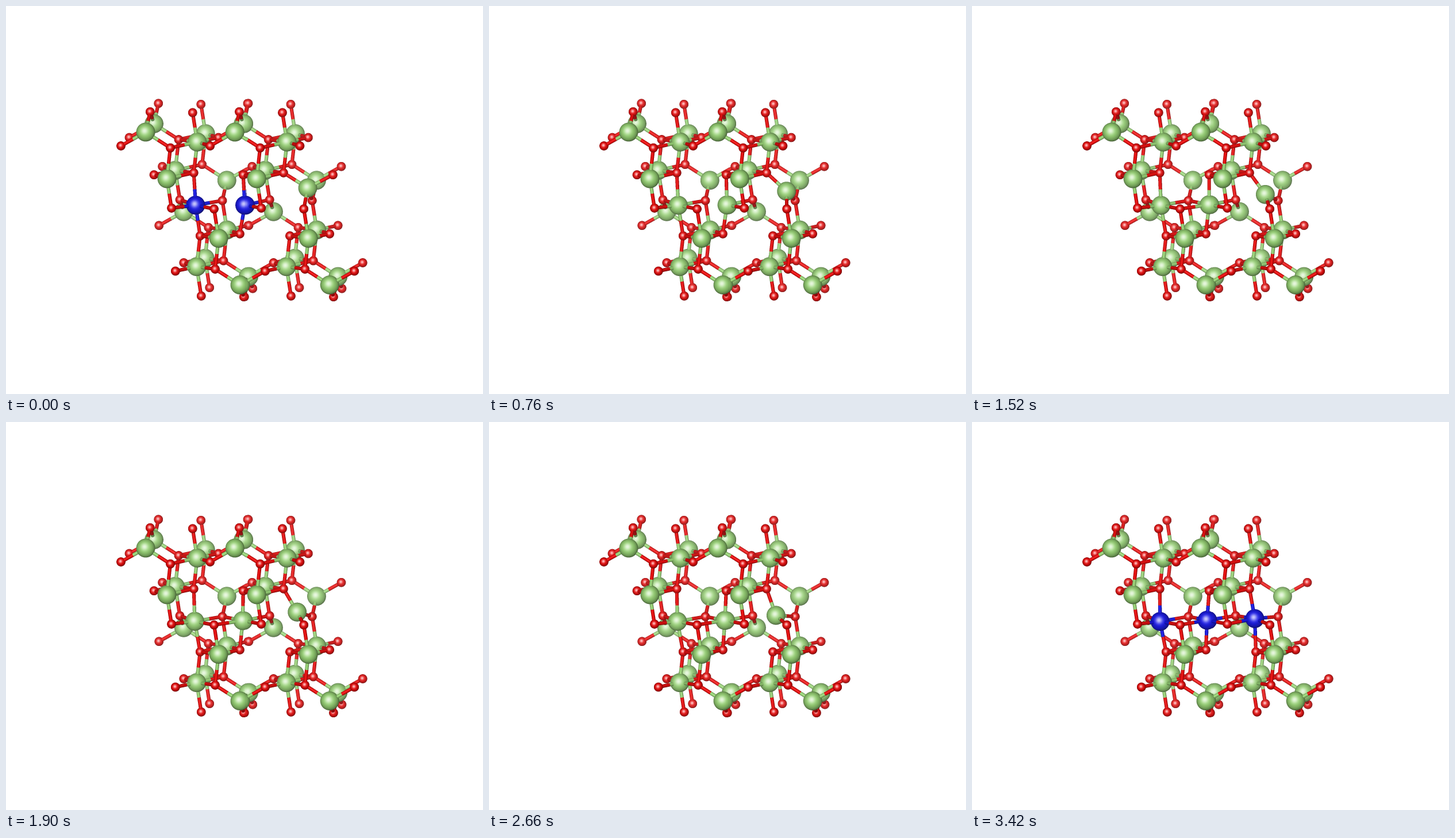
These frames come from a looping animation (830x674 px, 3.8 s). A matplotlib script:

```python
import itertools
import numpy as np
import matplotlib.pyplot as plt
from matplotlib.animation import FuncAnimation

W, H, DPI = 830, 674, 100
FRAMES, INTERVAL = 10, 380
X0, Y0, X1, Y1 = 180, 150, 640, 525   # region that holds the crystal
SS = 3                                # supersampling

# Crystal: in-layer x, y in pixels, third coordinate counts layers
A = np.array([155.2, 0, 0])
B = np.array([44.5, 160, 0.5])
INVERT = np.array([605.5, 543.5, 0.5])
TETRA = np.array([243, 219, 0])
OCTA = np.array([280, 300, 0])
OXYGEN = np.array([(200, 243, 0), (286, 246.5, 0), (288, 351, 0)])
LAYERS = (0, 0.5, 1, 1.5)
SHIFT, STEP = 14.5, 76                # screen offset and length of a layer
CUTOFF = 58.35                        # longest metal-oxygen bond

# Start and end of the migrating atoms on screen, all at half depth
PATHS = np.array([[(330, 346), (327.3, 346.5)],
                  [(415.5, 346), (409, 344.3)],
                  [(524, 316), (491, 341.5)]])

GREEN = np.array([0.62, 0.86, 0.48])
BLUE = np.array([0.08, 0.08, 0.94])
RED = np.array([0.95, 0.05, 0.05])
R_METAL, R_OXY, R_BOND = 16.4, 7.9, 3.1

LIGHT = np.array([-0.12, -0.14, 0.98])
LIGHT = LIGHT / np.linalg.norm(LIGHT)

gx = (np.arange((X1 - X0) * SS) + 0.5) / SS + X0
gy = (np.arange((Y1 - Y0) * SS) + 0.5) / SS + Y0


def images_of(site, cells_a, cells_b, layers):
    """Copies of a site under inversion and lattice translation."""
    for base in (site, INVERT - site):
        for n, m in itertools.product(cells_a, cells_b):
            p = base + n * A + m * B
            for d in layers:
                if (d - p[2]) % 1 == 0:
                    yield np.array([p[0], p[1], d])


def framework():
    metals = list(images_of(OCTA, range(2), range(2), LAYERS))
    # half-depth tetrahedra are filled only in the back layer
    metals += images_of(TETRA, range(2), range(2), (0, 1, 1.5))
    oxygens = [p for site in OXYGEN
               for p in images_of(site, range(-2, 4), range(-1, 3), LAYERS)]
    return metals, oxygens


def movers(u):
    d = 0.5
    for start, end in PATHS:
        x, y = start + (end - start) * u
        yield np.array([x - SHIFT * d, y + SHIFT * d, d])


def bonded(p, q):
    return np.linalg.norm((p - q) * (1, 1, STEP)) < CUTOFF


def to_view(p):
    """Crystal to camera space, z pointing at the viewer."""
    x, y, d = p
    return np.array([x + SHIFT * d, y - SHIFT * d, -73 * d - 0.2 * (y - x)])


class Canvas:
    def __init__(self):
        shape = (len(gy), len(gx))
        self.rgb = np.ones(shape + (3,))
        self.z = np.full(shape, -1e9)

    def window(self, xa, xb, ya, yb):
        i, j = np.searchsorted(gx, (xa, xb))
        k, m = np.searchsorted(gy, (ya, yb))
        return (slice(k, m), slice(i, j)), gx[None, i:j], gy[k:m, None]

    def paint(self, win, mask, z, normal, base, spec, fog):
        mask = mask & (z > self.z[win])
        nx, ny, nz = (n[mask] for n in normal)
        nl = np.clip(nx * LIGHT[0] + ny * LIGHT[1] + nz * LIGHT[2], 0, 1)
        color = base * (0.4 + 0.6 * nl)[:, None]
        color = color + (1 - color) * (spec * nl ** 14)[:, None]
        color = color + (1 - color) * fog
        self.rgb[win][mask] = color
        self.z[win][mask] = z[mask]

    def ball(self, c, r, base, fog):
        win, px, py = self.window(c[0] - r, c[0] + r, c[1] - r, c[1] + r)
        dx, dy = px - c[0], py - c[1]
        h = r * r - dx * dx - dy * dy
        nz = np.sqrt(np.maximum(h, 0))
        normal = (dx / r + 0 * nz, dy / r + 0 * nz, nz / r)
        self.paint(win, h > 0, c[2] + nz, normal, base, 0.75, fog)

    def stick(self, a, b, base_a, base_b, fog):
        r = R_BOND
        length = np.linalg.norm(b - a)
        ux, uy, uz = (b - a) / length
        lo, hi = np.minimum(a, b) - r, np.maximum(a, b) + r
        win, px, py = self.window(lo[0], hi[0], lo[1], hi[1])
        dx, dy = px - a[0], py - a[1]
        s = dx * ux + dy * uy
        k = 1 - uz * uz
        disc = (s * uz) ** 2 - k * (dx * dx + dy * dy - s * s - r * r)
        t = (s * uz + np.sqrt(np.maximum(disc, 0))) / k
        along = s + t * uz
        normal = ((dx - along * ux) / r, (dy - along * uy) / r,
                  (t - along * uz) / r)
        half = length / 2
        for base, part in ((base_a, (along >= 0) & (along < half)),
                           (base_b, (along >= half) & (along <= length))):
            self.paint(win, (disc > 0) & part, a[2] + t, normal, base,
                       0.15, fog)

    def image(self):
        out = np.ones((H, W, 3))
        small = self.rgb.reshape(Y1 - Y0, SS, X1 - X0, SS, 3)
        out[Y0:Y1, X0:X1] = small.mean(axis=(1, 3))
        return np.clip(out, 0, 1)


def fog_at(p):
    return 0.07 * p[2]


def render(i):
    last = i == FRAMES - 1
    metals = [(p, GREEN) for p in FIXED]
    for n, p in enumerate(movers(i / (FRAMES - 1))):
        # the third mover turns blue only on arrival
        blue = last or (i == 0 and n < 2)
        metals.append((p, BLUE if blue else GREEN))

    canvas = Canvas()
    for p, color in metals:
        canvas.ball(to_view(p), R_METAL, color, fog_at(p))
    for o in OXYGENS:
        near = [(p, c) for p, c in metals if bonded(p, o)]
        if near:
            canvas.ball(to_view(o), R_OXY, RED, fog_at(o))
        for p, color in near:
            fog = (fog_at(p) + fog_at(o)) / 2
            canvas.stick(to_view(p), to_view(o), color, RED, fog)
    return canvas.image()


FIXED, OXYGENS = framework()
images = [render(i) for i in range(FRAMES)]

fig = plt.figure(figsize=(W / DPI, H / DPI), dpi=DPI, facecolor="white")
ax = fig.add_axes([0, 0, 1, 1])
ax.axis("off")
view = ax.imshow(images[0], aspect="auto", interpolation="nearest")


def update(i):
    view.set_data(images[i])
    return [view]


anim = FuncAnimation(fig, update, frames=FRAMES, interval=INTERVAL,
                     repeat=True, repeat_delay=0, blit=False)
plt.show()
```
